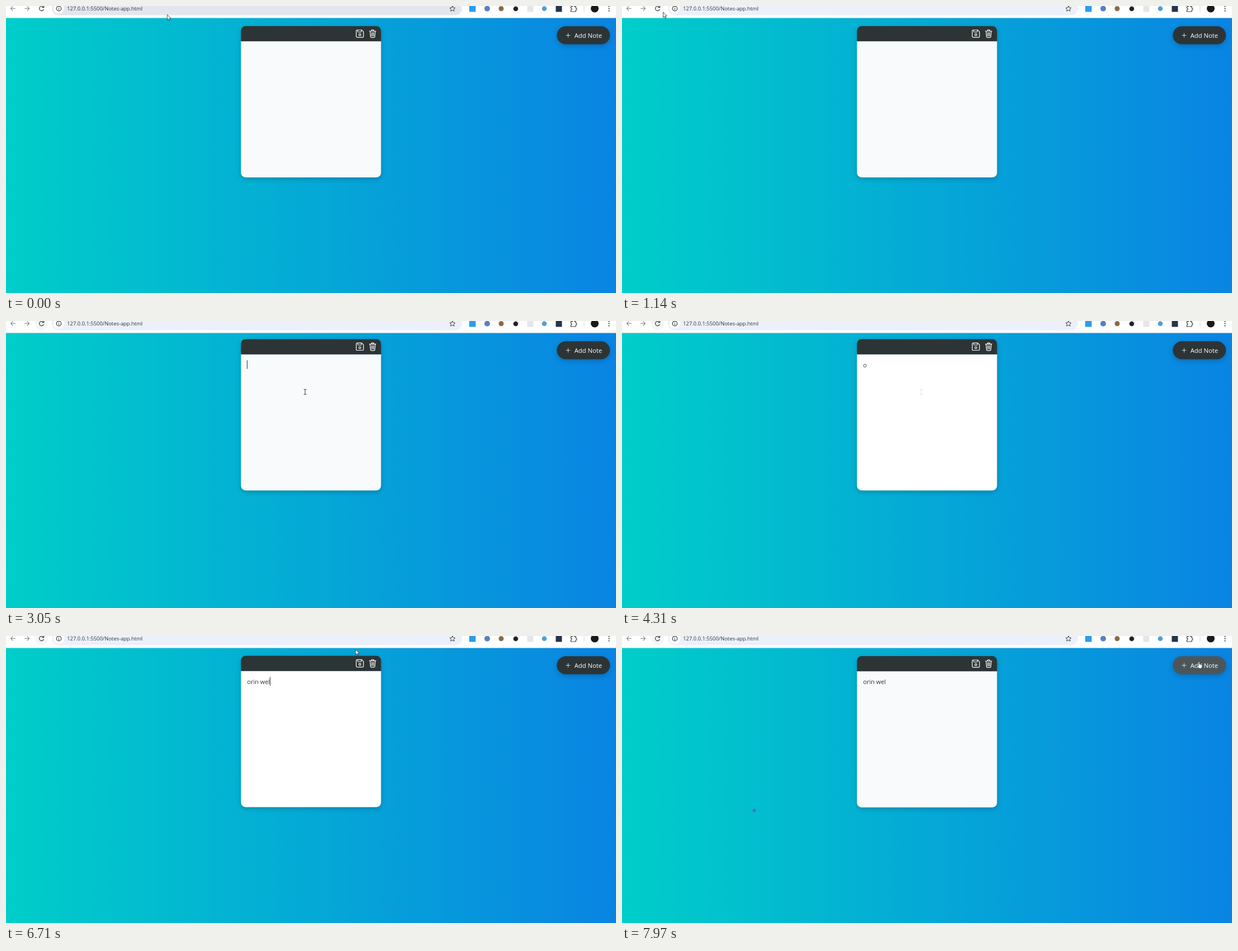
These frames come from a looping animation (1089x514 px, 8000 ms). An HTML page:

```html
<!DOCTYPE html>
<html lang="en">
<head>
<meta charset="utf-8">
<title>Notes app</title>
<style>
  html, body { margin: 0; width: 100%; height: 100%; overflow: hidden; background: #fff; }
  svg { display: block; width: 100%; height: 100%; }
  text { font-family: "Open Sans", "Noto Sans", sans-serif; white-space: pre; }
  .line { fill: none; stroke-linecap: round; stroke-linejoin: round; }
  .shadow { filter: drop-shadow(0 3.3px 4.3px rgba(0, 0, 0, .2)); }
</style>
</head>
<body>
<svg viewBox="0 0 1089 514">
  <defs>
    <linearGradient id="sky">
      <stop stop-color="#00cec9"/>
      <stop offset="1" stop-color="#0984e3"/>
    </linearGradient>
  </defs>

  <!-- browser toolbar -->
  <rect width="1089" height="21" fill="#fff"/>
  <rect y="20.6" width="1089" height="1.2" fill="#e6e9ec"/>
  <circle id="reloadHover" cx="63.5" cy="4.5" r="11.5" fill="#f3f5f6"/>
  <rect id="bar" x="82" y="-8" width="732" height="24.5" rx="12.2"/>
  <circle cx="94.3" cy="4.5" r="9.5" fill="#fff"/>
  <g class="line" stroke="#85888c" stroke-width="1.1">
    <path d="M16.5 4.5H8.5M12 1L8.5 4.5L12 8"/>
    <path d="M33.5 4.5H41.5M38 1L41.5 4.5L38 8"/>
  </g>
  <g class="line" stroke="#3c4043" stroke-width="1.2">
    <path id="reload" d="M67.2 6A4 4 0 1 1 66.6 2M67.6 -.5V2.6H64.5"/>
    <path id="stop" d="M60 1L67 8M67 1L60 8"/>
    <circle cx="94.3" cy="4.6" r="4.3"/>
    <path d="M94.3 4.5V6.8M94.3 2.5V2.6"/>
    <path d="M797 -.2L798.5 3L802 3.4L799.4 5.7L800.2 9.2L797 7.4L793.8 9.2L794.6 5.7L792 3.4L795.5 3Z" stroke-width="1"/>
    <path d="M1008.5 .8H1011.3A1.6 1.6 0 0 1 1014.5 .8H1017.3V3.8A1.6 1.6 0 0 1 1017.3 7V10H1008.5V7A1.6 1.6 0 0 0 1008.5 3.8Z"/>
  </g>
  <text x="109" y="8.4" font-size="9.37" fill="#33373c">127.0.0.1:5500/Notes-app.html</text>
  <rect x="827" y="-1" width="11.5" height="11.5" fill="#2a9df0"/>
  <circle cx="859" cy="4.7" r="5" fill="#5b7fc4"/>
  <circle cx="884" cy="4.7" r="4.5" fill="#8a6a45"/>
  <circle cx="910" cy="5" r="4.3" fill="#20242a"/>
  <rect x="930.5" y="-1" width="11" height="11.5" rx="1" fill="#e4e6e8"/>
  <circle cx="961" cy="4.7" r="4.3" fill="#4b9fd8"/>
  <rect x="981.5" y="-1" width="11" height="11.5" fill="#24344a"/>
  <path d="M1032 -1V10" stroke="#cfd6e4"/>
  <circle cx="1051" cy="4.5" r="7" fill="#1c1819"/>
  <path class="line" d="M1076.5 .7V9" stroke="#3c4043" stroke-width="2.2" stroke-dasharray="0 4"/>

  <!-- page -->
  <rect y="21.6" width="1089" height="493" fill="url(#sky)"/>
  <circle id="dot" cx="236" cy="312.5" r="2.9" fill="#5f62d2"/>

  <rect id="button" class="shadow" x="983.3" y="36.2" width="95" height="32.4" rx="16.2"/>
  <path id="plus" class="line" d="M1000 52.5H1007M1003.5 49V56" stroke="#e4e6e6" stroke-width=".9"/>
  <text x="1014.7" y="57" font-size="11.25" font-weight="500" fill="#fff">Add Note</text>

  <g id="card">
    <g class="shadow">
      <path id="paper" d="M419.5 63H669.5V298.7a8.3 8.3 0 0 1 -8.3 8.3H427.8a8.3 8.3 0 0 1 -8.3 -8.3Z"/>
      <path d="M419.5 63.3V44.3a8.3 8.3 0 0 1 8.3 -8.3H661.2a8.3 8.3 0 0 1 8.3 8.3V63.3Z" fill="#2d3436"/>
    </g>
    <g id="icons" class="line" stroke="#fff" stroke-width="1.2">
      <path d="M627 43H635L638.2 46.2V54.4A1.7 1.7 0 0 1 636.5 56.1H627A1.7 1.7 0 0 1 625.3 54.4V44.7A1.7 1.7 0 0 1 627 43Z"/>
      <path d="M627.9 43.4V46.6H634.4V43.4" stroke-width="1"/>
      <circle cx="631.7" cy="51.4" r="1.8"/>
      <path d="M648.8 45H660.4M652.2 44.8L653 42.8H656.2L657 44.8M650 45.2L650.8 55A1.5 1.5 0 0 0 652.3 56.4H656.9A1.5 1.5 0 0 0 658.4 55L659.2 45.2"/>
      <path d="M652.7 47.5V53.8M654.6 47.5V53.8M656.5 47.5V53.8" stroke-width="1"/>
    </g>
    <text id="note" x="430.4" y="86.3" font-size="10.9" fill="#2d3436"></text>
    <rect id="caret" y="74" width="1" height="15.3" fill="#2d3436"/>
  </g>

  <!-- pointers, each with its hot spot at 0,0 -->
  <path id="arrow" d="M0 0V9.6L2.2 7.6L3.7 11L5.2 10.4L3.7 7H6.7Z" fill="#fff" stroke="#222" stroke-width=".8"/>
  <path id="beam" class="line" d="M-2 -4.5H-.5L0 -4L.5 -4.5H2M0 -4V4M-2 4.5H-.5L0 4L.5 4.5H2" stroke="#222" stroke-width=".9"/>
  <path id="hand" d="M-1 1a1 1 0 0 1 2 0V4.6L5 5.4Q6 5.7 5.8 6.8L5 12H0L-3.2 8Q-3.4 6.5 -2.2 6.8L-1 7.8Z" fill="#fff" stroke="#222" stroke-width=".6"/>
</svg>

<script>
const LOOP = 8000, BLINK = 530, LIFT = 3.6;
const FOCUS = 3050, BLUR = 7280, RELOAD = 2120;
const el = Object.fromEntries([...document.querySelectorAll('[id]')].map(e => [e.id, e]));

// Each pointer move: from time, to time, place reached
const origin = { x: 288, y: 15.5 };
const moves = [
  { from: 70, to: 460, x: 470, y: 150 },
  { from: 660, to: 1140, x: 73.5, y: 11 },
  { from: 1530, to: 1970, x: 65, y: 6 },
  { from: RELOAD, to: 2450, x: 534, y: 127 },
  { from: 6170, to: 6620, x: 624, y: 24 },
  { from: 6700, to: 7100, x: 631.5, y: 45 },
  { from: 7370, to: 7770, x: 953, y: 50 },
  { from: 7840, to: 7970, x: 1030, y: 46 }
];
const hovers = [[200, 680], [2330, 6500], [6800, 7470]];
const typed = 'orin wel';
const keyTimes = [3760, 4440, 4770, 4920, 5040, 5170, 5500, 5650];

const within = (t, from, to) => t >= from && t < to;
const show = (node, on) => node.setAttribute('visibility', on ? 'visible' : 'hidden');
const mix = (a, b, k) => `rgb(${a.map((v, i) => v + (b[i] - v) * k)})`;

// Eased 0 to 1 over a length of time
function ramp(t, from, length) {
  const k = Math.min(1, Math.max(0, (t - from) / length));
  return k * k * (3 - 2 * k);
}

// A transition in, then out again
const pulse = (t, on, off, length) => ramp(t, on, length) - ramp(t, off, length);

function pointerAt(t) {
  return moves.reduce((p, m) => {
    const k = ramp(t, m.from, m.to - m.from);
    return { x: p.x + (m.x - p.x) * k, y: p.y + (m.y - p.y) * k };
  }, origin);
}

function pointerKind({ x, y }, top) {
  if (x > 984 && x < 1078 && y > 36 && y < 69) return 'hand';
  if (x > 419 && x < 670 && y > top && y < top + 271) {
    if (y > top + 27) return 'beam';
    if (x > 623) return 'hand';
  }
  return 'arrow';
}

function draw(t) {
  const lift = LIFT * hovers.reduce((sum, [on, off]) => sum + pulse(t, on, off, 280), 0);
  const pointer = pointerAt(t);
  const loading = within(t, RELOAD, RELOAD + 80);
  const iconsReady = !within(t, RELOAD + 40, 2600);

  el.card.setAttribute('transform', `translate(0 ${-lift})`);
  el.paper.setAttribute('fill', mix([248, 250, 252], [255, 255, 255], pulse(t, FOCUS, BLUR, 180)));
  el.button.setAttribute('fill', mix([45, 52, 54], [99, 110, 114], ramp(t, 7860, 200)));
  el.bar.setAttribute('fill', t < 110 ? '#e3e6ed' : '#ebf0fa');
  show(el.reloadHover, t >= 1530);
  show(el.reload, !loading);
  show(el.stop, loading);
  show(el.icons, iconsReady);
  show(el.plus, iconsReady);
  show(el.dot, t >= 7900);

  // The caret blink restarts on focus and on every key
  const pressed = keyTimes.filter(k => k <= t);
  const sinceKey = t - (pressed.at(-1) ?? FOCUS);
  el.note.textContent = typed.slice(0, pressed.length);
  const width = pressed.length ? el.note.getComputedTextLength() : 0;
  el.caret.setAttribute('x', Math.round(430.2 + width));
  show(el.caret, within(t, FOCUS, BLUR) && sinceKey % (2 * BLINK) < BLINK);

  const kind = pointerKind(pointer, 36 - lift);
  for (const name of ['arrow', 'beam', 'hand']) {
    show(el[name], name === kind);
    el[name].setAttribute('transform', `translate(${pointer.x} ${pointer.y})`);
  }
  el.beam.setAttribute('opacity', within(t, 3240, 6200) ? .15 : 1);
}

const start = performance.now();
function tick() {
  draw((performance.now() - start) % LOOP);
  requestAnimationFrame(tick);
}
tick();
</script>
</body>
</html>
```
